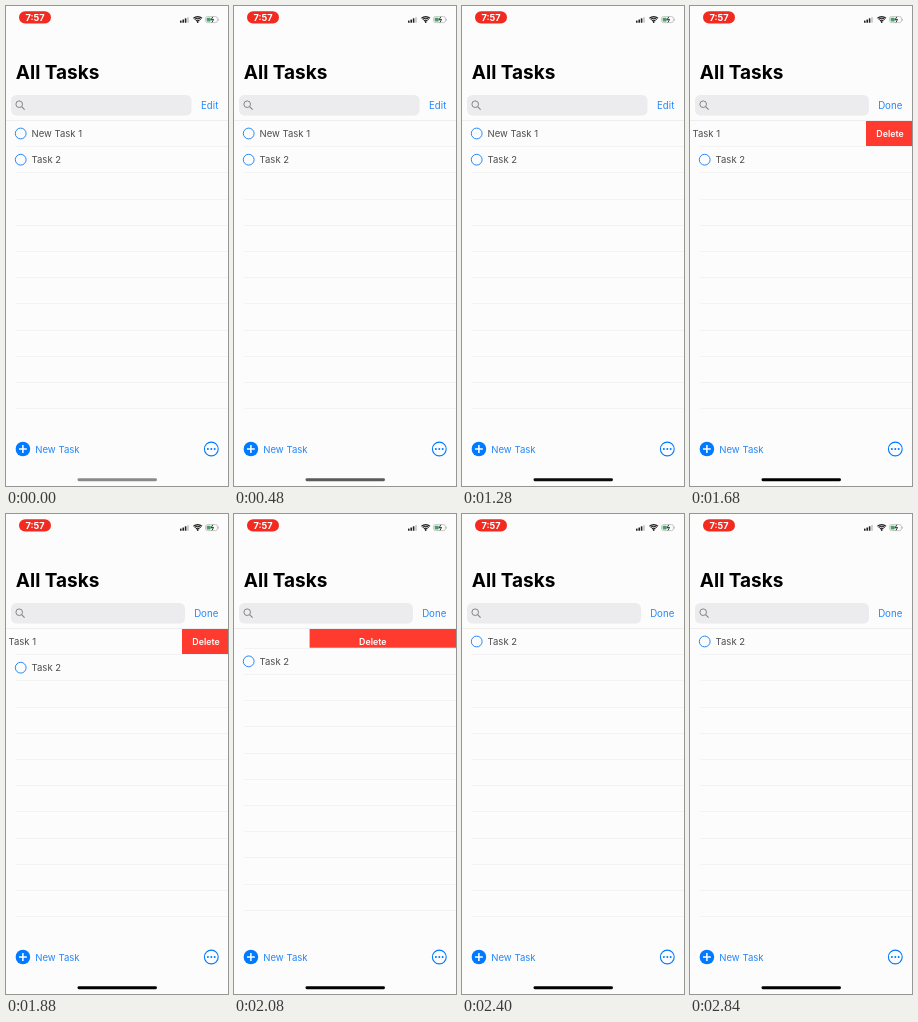
These frames come from a looping animation (222 by 480 pixels, 2880 ms). An HTML page with a canvas:

```html
<!DOCTYPE html>
<html lang="en">
<head>
<meta charset="utf-8">
<title>Task list</title>
<style>
  html, body { margin: 0; width: 100%; height: 100%; overflow: hidden; background: #fcfcfc; }
  canvas { display: block; width: 222px; height: 480px; }
</style>
</head>
<body>
<canvas id="stage" width="222" height="480"></canvas>
<script>
const W = 222, H = 480, LOOP = 2880;
const LIST_TOP = 114, ROW = 26.2, LIST_BOTTOM = 418, ACTION = 46;
const BG = '#fcfcfc', BLUE = '#007aff', LINK = '#2488fb', RED = '#ff3b30', LINE = '#f4f3f3', INK = '#4c4c4e';
const FONT = 'Inter, Roboto, sans-serif';

const canvas = document.getElementById('stage');
const ctx = canvas.getContext('2d');
const dpr = window.devicePixelRatio || 1;
canvas.width = W * dpr;
canvas.height = H * dpr;

const mix = (a, b, p) => a + (b - a) * p;
const progress = (t, start, end) => Math.min(1, Math.max(0, (t - start) / (end - start)));
const smooth = p => p * p * (3 - 2 * p);

function rect(x, y, w, h, color, radius = 0) {
  ctx.fillStyle = color;
  ctx.beginPath();
  ctx.roundRect(x, y, w, h, radius);
  ctx.fill();
}

function circle(x, y, r, color, lineWidth) {
  ctx.beginPath();
  ctx.arc(x, y, r, 0, Math.PI * 2);
  if (lineWidth) stroke(color, lineWidth);
  else { ctx.fillStyle = color; ctx.fill(); }
}

function stroke(color, lineWidth) {
  ctx.strokeStyle = color;
  ctx.lineWidth = lineWidth;
  ctx.stroke();
}

function line(x1, y1, x2, y2, color, lineWidth) {
  ctx.beginPath();
  ctx.moveTo(x1, y1);
  ctx.lineTo(x2, y2);
  stroke(color, lineWidth);
}

function text(str, x, y, size, color, { weight = 400, align = 'left' } = {}) {
  ctx.font = `${weight} ${size}px ${FONT}`;
  ctx.textAlign = align;
  ctx.fillStyle = color;
  ctx.fillText(str, x, y);
}

function clipped(x, y, w, h, draw) {
  ctx.save();
  ctx.beginPath();
  ctx.rect(x, y, w, h);
  ctx.clip();
  draw();
  ctx.restore();
}

function statusBar() {
  rect(13, 5.3, 32, 12.2, '#f22a20', 6.1);
  text('7:57', 29, 15.1, 9.2, '#fff', { weight: 700, align: 'center' });

  for (let i = 0; i < 4; i++) {
    const h = 2.2 + i * 1.2;
    rect(174 + i * 2.4, 16.8 - h, 1.6, h, i < 3 ? '#222' : '#c4c4c4', 0.4);
  }

  for (const r of [2.5, 4.4, 6.2]) {
    ctx.beginPath();
    ctx.arc(191.7, 16.8, r, -Math.PI * 0.74, -Math.PI * 0.26);
    stroke('#222', 1.2);
  }
  circle(191.7, 16, 0.9, '#222');

  ctx.beginPath();
  ctx.roundRect(199.6, 10.6, 11.8, 6, 1.8);
  stroke('#a9b3ac', 0.7);
  rect(200.7, 11.7, 4, 3.8, '#4f9a6b', 0.8);
  rect(212.1, 12.5, 0.8, 2.2, '#b0b0b0', 0.4);
  ctx.beginPath();
  ctx.moveTo(206.8, 10.8);
  ctx.lineTo(205, 13.9);
  ctx.lineTo(207.6, 13.4);
  ctx.lineTo(206, 16.4);
  stroke('#222', 0.9);
}

function header(editing) {
  text('All Tasks', 9.8, 73.3, 19, '#000', { weight: 700 });
  rect(5, 89, mix(180.5, 174, editing), 20.6, '#ecebed', 5.5);
  circle(13.2, 98.2, 3.3, '#858589', 1);
  line(15.6, 100.6, 18.6, 103.6, '#858589', 1.1);

  ctx.globalAlpha = 1 - editing;
  text('Edit', 212.3, 103.2, 9.7, LINK, { align: 'right' });
  ctx.globalAlpha = editing;
  text('Done', 212.3, 103.2, 9.7, LINK, { align: 'right' });
  ctx.globalAlpha = 1;
}

function task(label, x, y) {
  circle(x + 14.7, y + 13.5, 5.4, LINK, 1);
  text(label, x + 25.6, y + 17.1, 9.5, INK);
}

function firstRow(open, height) {
  if (height <= 0) return;
  clipped(0, LIST_TOP, W, height, () => {
    task('New Task 1', -open, LIST_TOP);
    if (open <= 0) return;
    const left = W - open;
    rect(left, LIST_TOP, open, ROW, RED);
    const labelX = left + 24 + Math.max(0, open - ACTION) * 0.39;
    text('Delete', labelX, 130.6, 8.8, '#fff', { weight: 600, align: 'center' });
  });
}

function list(open, collapse) {
  const firstHeight = ROW * (1 - collapse);
  const nextTop = LIST_TOP + firstHeight;
  clipped(0, 0, W, LIST_BOTTOM, () => {
    firstRow(open, firstHeight);
    task('Task 2', 0, nextTop);
    for (let i = 0; i < 13; i++) {
      const y = Math.round(nextTop + i * ROW);
      if (y > LIST_TOP) rect(10, y, W - 10, 1, LINE);
    }
    rect(0, LIST_TOP, W, 1, '#eeeeee');
  });
}

function toolbar(t) {
  circle(16.9, 443, 7.3, BLUE);
  line(13, 443, 20.8, 443, '#fff', 1.5);
  line(16.9, 439.1, 16.9, 446.9, '#fff', 1.5);
  text('New Task', 29.2, 446.8, 9.6, LINK);

  circle(205.3, 443, 6.9, BLUE, 1.1);
  for (const dx of [-3.4, 0, 3.4]) circle(205.3 + dx, 443, 1, BLUE);

  const shade = Math.round(mix(138, 0, progress(t, 0, 1400)));
  rect(71.5, 472.3, 79.5, 2.9, `rgb(${shade},${shade},${shade})`, 1.45);
}

function draw(t) {
  const swipe = 1 - (1 - progress(t, 1380, 1660)) ** 2;
  const expand = smooth(progress(t, 1895, 2235));
  const open = mix(ACTION * swipe, W, expand);
  const collapse = smooth(progress(t, 1985, 2285));
  const editing = progress(t, 1400, 1560);

  ctx.setTransform(dpr, 0, 0, dpr, 0, 0);
  rect(0, 0, W, H, BG);
  statusBar();
  header(editing);
  list(open, collapse);
  toolbar(t);
}

function frame() {
  draw(performance.now() % LOOP);
  requestAnimationFrame(frame);
}
frame();
</script>
</body>
</html>
```
